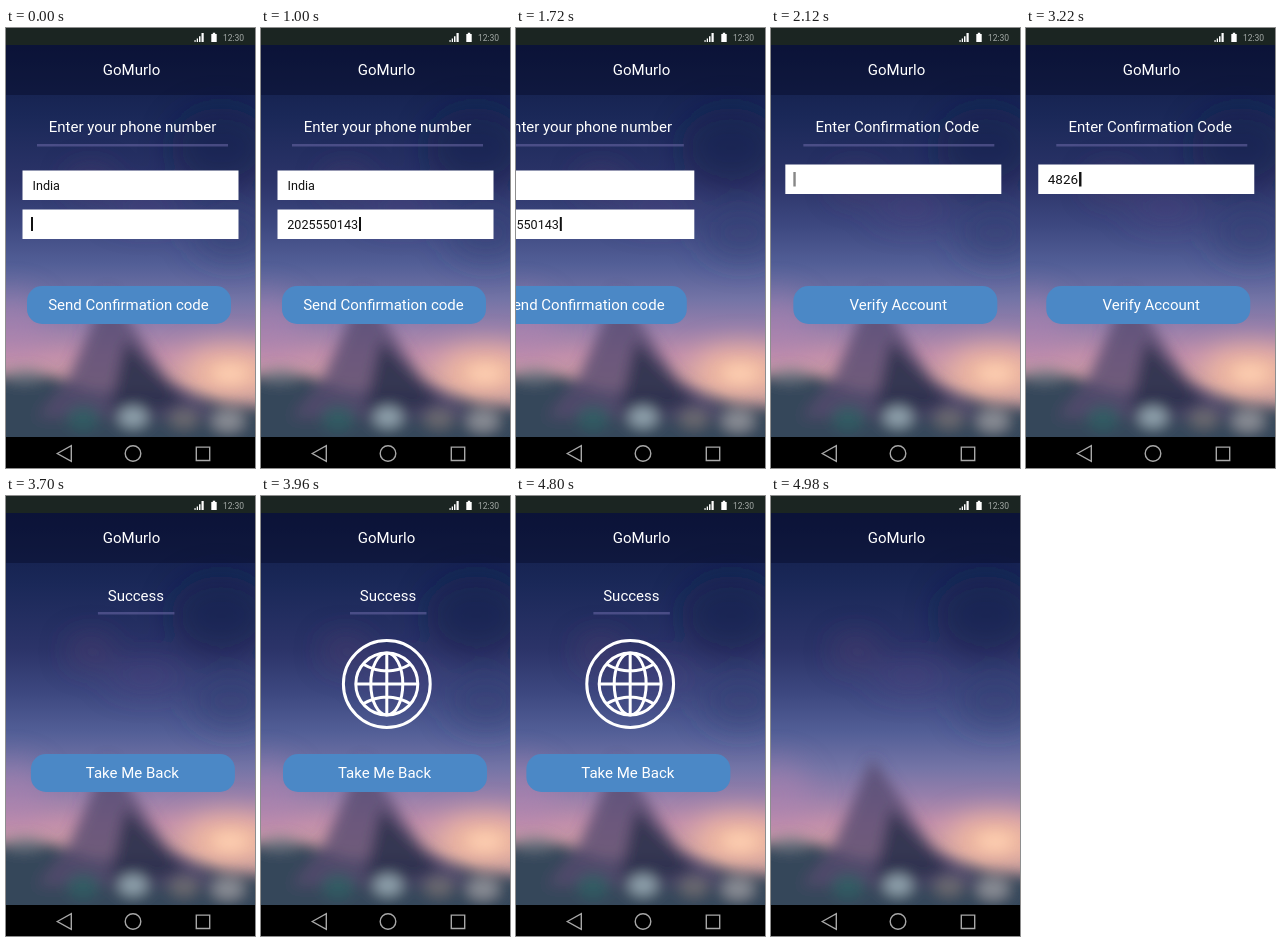
Recreate the animation shown at these times as an HTML page. Size 249 by 440 pixels, loop 5.04 s.

```html
<!DOCTYPE html>
<html lang="en">
<head>
<meta charset="utf-8">
<title>Phone verification</title>
<style>
  html, body { margin: 0; height: 100%; overflow: hidden; background: #000; }
  svg { display: block; width: 100%; height: 100%; }
  text { font: 15px Roboto, sans-serif; fill: #fff; text-anchor: middle; }
  .field text { font-size: 12.6px; fill: #111; text-anchor: start; }
  .field #code { font-size: 13.5px; }
  .field rect { fill: #fff; }
  .field .cursor { fill: #111; }
  .button { fill: #4b88c6; }
  .rule { fill: #6d6aa8; opacity: .55; }
  .line { fill: none; stroke: #fff; stroke-width: 3; }
  .nav { fill: none; stroke: #a8a8a8; stroke-width: 1.4; }
  .soft { filter: url(#blur); }
  .softer { filter: url(#blurMore); }
</style>
</head>
<body>
<svg viewBox="0 0 249 440">
  <defs>
    <linearGradient id="sky" x2="0" y2="1">
      <stop offset="0" stop-color="#101a45"/>
      <stop offset=".18" stop-color="#1a2858"/>
      <stop offset=".35" stop-color="#2c3469"/>
      <stop offset=".46" stop-color="#3d4880"/>
      <stop offset=".56" stop-color="#535f97"/>
      <stop offset=".65" stop-color="#7474a6"/>
      <stop offset=".72" stop-color="#967fab"/>
      <stop offset=".79" stop-color="#c18fab"/>
      <stop offset=".86" stop-color="#cf9ea3"/>
      <stop offset="1" stop-color="#9a8088"/>
    </linearGradient>
    <filter id="blur" x="-60%" y="-60%" width="220%" height="220%"><feGaussianBlur stdDeviation="7"/></filter>
    <filter id="blurMore" x="-90%" y="-90%" width="280%" height="280%"><feGaussianBlur stdDeviation="15"/></filter>
    <clipPath id="screen"><path d="M0 17H249V409H0z"/></clipPath>
  </defs>

  <g clip-path="url(#screen)">
    <path d="M0 17H249V409H0z" fill="url(#sky)"/>
    <g class="softer">
      <ellipse cx="85" cy="155" rx="22" ry="14" fill="#5a4070" opacity=".5"/>
      <ellipse cx="140" cy="180" rx="38" ry="14" fill="#4f4580" opacity=".5"/>
      <ellipse cx="215" cy="120" rx="50" ry="40" fill="#17214e" opacity=".55"/>
      <ellipse cx="225" cy="205" rx="40" ry="28" fill="#333c70" opacity=".5"/>
      <ellipse cx="5" cy="300" rx="35" ry="35" fill="#b083b2" opacity=".5"/>
      <ellipse cx="225" cy="343" rx="48" ry="22" fill="#f7bfa0"/>
    </g>
    <g class="soft">
      <path d="M-20 350L25 344L60 352L85 364L180 364L215 376L270 382V425H-20z" fill="#34465a"/>
      <path d="M101 262L135 310L160 348L195 372L215 390H30L62 350L82 305z" fill="#574a70" opacity=".8"/>
      <path d="M120 312L146 340L180 374L150 384H104z" fill="#262d49" opacity=".8"/>
      <ellipse cx="224" cy="346" rx="17" ry="9" fill="#ffd3b4" opacity=".8"/>
      <ellipse cx="18" cy="348" rx="20" ry="7" fill="#7b7f8a" opacity=".7"/>
      <ellipse cx="77" cy="390" rx="16" ry="12" fill="#2d6064" opacity=".8"/>
      <ellipse cx="127" cy="389" rx="14" ry="10" fill="#93a5b0"/>
      <ellipse cx="178" cy="391" rx="14" ry="9" fill="#6c6a70"/>
      <ellipse cx="222" cy="393" rx="16" ry="10" fill="#8c8f97"/>
    </g>
    <path d="M0 17H249V67H0z" fill="#080d28" opacity=".45"/>
  </g>

  <text x="125.5" y="47">GoMurlo</text>

  <g id="phonePage">
    <text x="126.5" y="104.2">Enter your phone number</text>
    <rect class="rule" x="31" y="116" width="191" height="2.5"/>
    <g class="field">
      <rect x="16.5" y="142.5" width="216" height="29.5"/>
      <text x="26.5" y="162">India</text>
      <rect x="16.5" y="181.5" width="216" height="29.5"/>
      <text id="phone" x="26.3" y="201"></text>
      <rect id="phoneCursor" class="cursor" y="189" width="2" height="14"/>
    </g>
    <rect class="button" x="21" y="258" width="204" height="38" rx="15"/>
    <text x="122.5" y="282.3">Send Confirmation code</text>
  </g>

  <g id="codePage">
    <text x="126" y="104.2">Enter Confirmation Code</text>
    <rect class="rule" x="32" y="116" width="191" height="2.5"/>
    <g class="field">
      <rect x="14" y="136.5" width="216" height="29.5"/>
      <text id="code" x="23.5" y="156.3"></text>
      <rect id="codeCursor" class="cursor" y="144" width="2.4" height="14.5"/>
    </g>
    <rect class="button" x="22" y="258" width="204" height="38" rx="15"/>
    <text x="127" y="282.3">Verify Account</text>
  </g>

  <g id="donePage">
    <text x="127" y="105.3">Success</text>
    <rect class="rule" x="89" y="116" width="76.5" height="2.5"/>
    <g id="globe" class="line">
      <circle r="43.4"/>
      <circle r="31"/>
      <ellipse rx="16" ry="31"/>
      <path d="M-31 0H31M0-31V31M-24-20Q0-6 24-20M-24 20Q0 6 24 20"/>
    </g>
    <rect class="button" x="22" y="258" width="204" height="38" rx="15"/>
    <text x="123.5" y="282.3">Take Me Back</text>
  </g>

  <path d="M0 0H249V17H0z" fill="#1b2522"/>
  <path d="M188.5 14V12H189.6V14zM190.7 14V10.4H192V14zM193 14V8.2H194.5V14zM195.5 14V5H197.7V14z" fill="#fff"/>
  <path d="M205.3 6H206.8V4.8H209.2V6H210.7V14H205.3z" fill="#fff"/>
  <text x="227.5" y="12.5" style="font-size:8.5px;fill:#a5aba8">12:30</text>
  <path d="M0 409H249V440H0z"/>
  <g class="nav">
    <path d="M51.3 425.5L65.3 417.7V433.3z"/>
    <circle cx="127" cy="425.5" r="7.8"/>
    <path d="M190.3 419.1H203.7V432.5H190.3z"/>
  </g>
</svg>

<script>
const LOOP = 5040, STEP = 20, SLIDE = 530, EXIT = 415, ENTER = 315;
const $ = id => document.getElementById(id);

const ease = (t, start, duration) => {
  const u = Math.min(1, Math.max(0, (t - start) / duration));
  return u * u * (3 - 2 * u);
};
const place = (id, x) => $(id).setAttribute("transform", `translate(${x})`);

const phoneKeys = [60, 220, 320, 540, 613, 686, 760, 833, 906, 980];
const codeKeys = [2160, 2310, 2460, 2620];

// The cursor follows each typed digit one step later.
function type(id, value, keys, t, home, first, advance) {
  const typed = time => keys.filter(key => key <= time).length;
  const n = typed(t - STEP);
  $(id).textContent = value.slice(0, typed(t));
  $(id + "Cursor").setAttribute("x", n ? first + advance * n : home);
}

function draw(now) {
  const t = Math.floor(now % LOOP / STEP) * STEP;
  const toCode = ease(t, 1600, SLIDE);
  const toDone = ease(t, 3200, SLIDE);
  const away = ease(t, 4780, 200);

  place("phonePage", -EXIT * toCode);
  place("codePage", ENTER * (1 - toCode) - EXIT * toDone);
  place("donePage", ENTER * (1 - toDone) - EXIT * away);

  type("phone", "2025550143", phoneKeys, t, 25, 27, 7.1);
  type("code", "4826", codeKeys, t, 22, 24.4, 7.6);
  $("codeCursor").style.opacity = t < 2160 ? .5 : 1;

  const globeX = 125.8 + 200 * (1 - ease(t, 3740, 220));
  const pulse = ease(t, 3960, 60) - ease(t, 4020, 80);
  $("globe").setAttribute("transform", `translate(${globeX} 188) scale(${1 + .26 * pulse})`);

  requestAnimationFrame(() => draw(performance.now() - begin));
}

const begin = performance.now();
draw(0);
</script>
</body>
</html>
```
